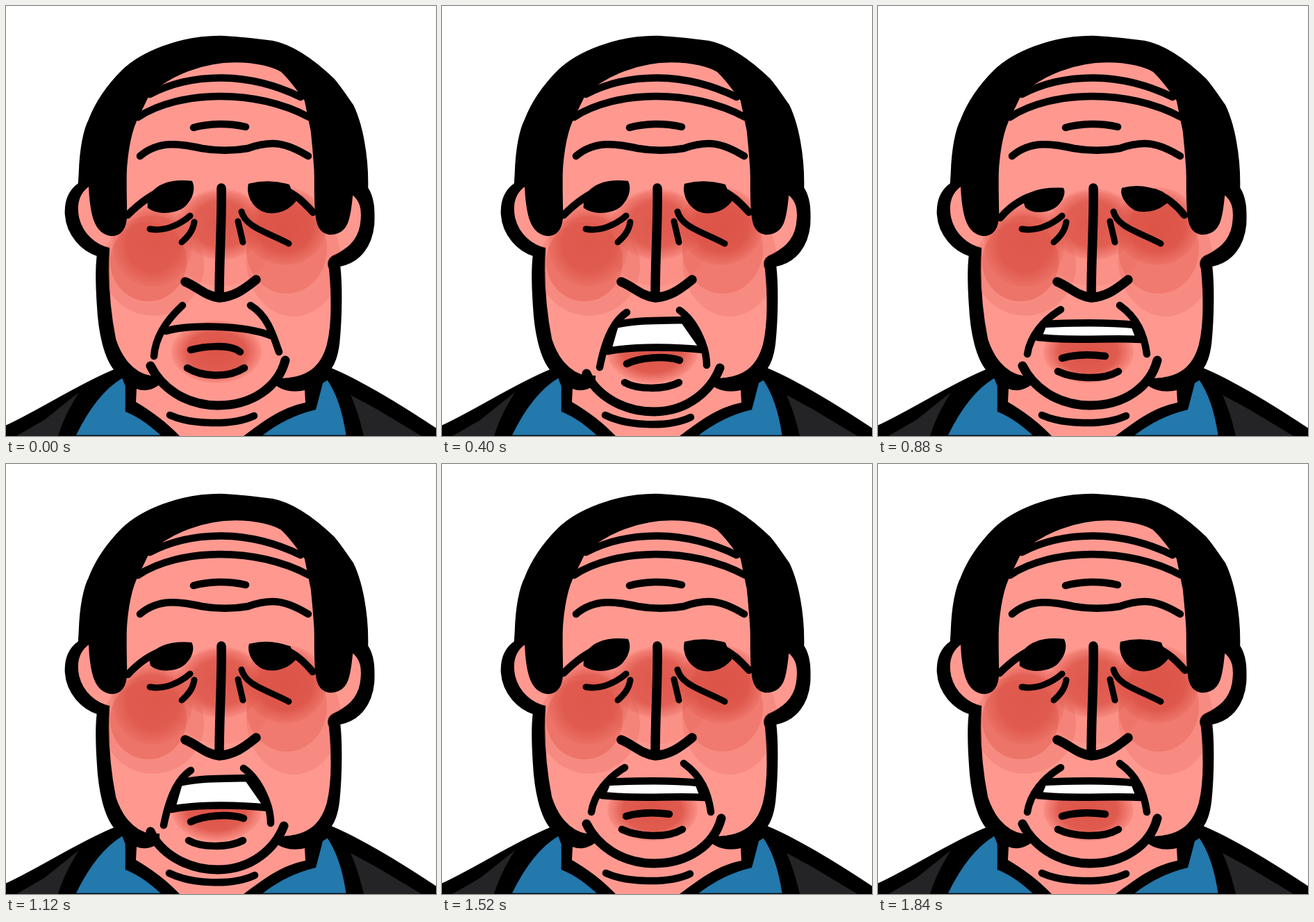
An HTML page for the animation above (1.92 s loop, 619 by 619 pixels).

```html
<!DOCTYPE html>
<html>
<head>
<meta charset="utf-8">
<style>
html, body { margin: 0; width: 100%; height: 100%; overflow: hidden; background: #fff; }
svg { display: block; width: 100%; height: 100%; }
.skin { fill: #ff9990; }
.blue { fill: #2378ac; }
.jacket { fill: #242426; }
.edge { stroke: #000; stroke-width: 2.5; }
.line { fill: none; stroke: #000; stroke-width: 10.5; stroke-linecap: round; stroke-linejoin: round; }
</style>
</head>
<body>
<svg viewBox="0 0 619 619">
  <defs>
    <radialGradient id="flush">
      <stop offset="0" stop-color="#dc5347"/>
      <stop offset=".65" stop-color="#dc5347" stop-opacity=".88"/>
      <stop offset="1" stop-color="#dc5347" stop-opacity=".15"/>
    </radialGradient>
    <path id="face" d="M205,128C235,98 285,80 330,80C362,80 385,87 397,94C412,108 422,124 431,136L440,180C443,210 446,250 446,270H498C512,280 514,295 511,315C507,340 490,352 470,361C464,365 463,372 466,378C470,420 470,460 463,488C454,520 435,535 400,537L207,533C182,529 165,505 157,480C149,440 145,400 148,349C130,345 110,330 104,305C100,285 105,268 120,258H172C172,220 178,185 187,165Z"/>
    <clipPath id="inFace"><use href="#face"/></clipPath>
  </defs>

  <!-- silhouette, clothes, neck -->
  <path class="edge" d="M106,240C107,205 113,177 120,164C130,138 147,114 168,93C195,67 250,44 308,44C335,45 358,48 383,51C415,57 447,82 472,106C484,120 492,134 499,143C512,170 521,215 520,262C529,276 530,292 529,315C526,345 510,368 480,374C483,400 483,445 479,485C477,502 473,514 467,522C510,540 565,573 619,609V619H0V605C50,582 105,545 157,524C142,506 134,470 132,430C130,400 130,375 132,359C110,352 88,330 86,300C85,280 92,265 105,256Z"/>
  <path class="jacket" d="M15,619L55,596L105,556C90,580 82,597 75,619ZM496,560L533,580L598,619H515C510,598 505,580 496,560Z"/>
  <path class="blue edge" d="M168,534L173,547V583C195,592 210,605 226,619H99C112,592 135,553 168,534ZM463,537C478,558 486,585 491,619H366C390,600 415,587 445,580L449,565L455,542Z"/>
  <use class="skin edge" href="#face"/>
  <path class="skin" d="M188,551C200,556 212,552 221,545V500H387V545C400,556 418,556 430,553L431,571C395,578 368,600 342,619H250C232,600 209,583 187,570Z"/>

  <!-- flushed cheeks and nose -->
  <g clip-path="url(#inFace)" fill="#dc5347">
    <ellipse cx="212" cy="374" rx="73" ry="72" opacity=".22"/>
    <ellipse cx="205" cy="368" rx="55" ry="57" opacity=".4"/>
    <ellipse cx="310" cy="335" rx="75" ry="68" opacity=".12"/>
    <ellipse cx="414" cy="365" rx="68" ry="82" opacity=".2"/>
    <ellipse cx="404" cy="350" rx="58" ry="64" opacity=".3"/>
    <g fill="url(#flush)">
      <ellipse cx="211" cy="343" rx="58" ry="61" opacity=".85"/>
      <ellipse cx="310" cy="314" rx="64" ry="51" opacity=".92"/>
      <ellipse cx="402" cy="317" rx="60" ry="56"/>
    </g>
  </g>
  <ellipse cx="303" cy="498" rx="65" ry="45" fill="url(#flush)"/>

  <!-- sideburns -->
  <path class="edge" d="M120,250L172,235L173,300C173,320 165,330 152,330C130,328 121,305 120,250ZM445,240H498V272C495,305 492,328 466,328C448,326 445,310 445,260Z"/>

  <!-- wrinkles and nose -->
  <path class="line" d="M207,127C270,95 350,95 424,131M190,160C250,121 360,119 436,160M270,175C292,169 320,168 345,174M193,216C220,193 250,198 282,205C305,209 325,209 348,205C385,192 405,198 435,216"/>
  <path class="line" style="stroke-width:9" d="M207,321C228,325 250,315 265,302M271,311C269,324 262,332 253,340M339,296C345,318 372,324 407,342M334,310L341,340"/>
  <path class="line" style="stroke-width:13.5" d="M310,262C311,310 307,360 307,419M258,397C275,404 288,418 307,420C328,418 340,410 360,394"/>

  <path id="lids" class="line"/>
  <path id="pupils" class="edge"/>
  <path id="teeth" class="line" style="fill:#fff"/>
  <path id="creases" class="line"/>
  <path id="chin" class="line" style="stroke-width:13"/>
</svg>
<script>
// Each part lists its poses: mouth closed / half / open, eyes open / narrow / shut.
const mouth = {
  teeth: [
    'M230,468C260,459 340,458 383,475L383,475C340,458 260,459 230,468Z',
    'M238,458C280,456 330,455 369,459L377,480C335,477 285,483 230,477Z',
    'M249,459C285,451 320,453 348,452L378,495C340,491 280,489 238,497Z'],
  creases: [
    'M254,431C230,453 215,478 213,504M352,431C377,446 385,475 393,498M266,495C285,490 322,486 337,498M261,521C280,533 318,537 343,521M236,589C265,602 325,605 357,590',
    'M263,437C238,452 219,475 215,501M348,431C373,449 383,472 387,501M265,507C282,502 305,501 327,504M259,526C280,536 322,540 346,526M236,589C265,602 325,605 357,590',
    'M266,441C243,456 233,490 227,520M342,438C364,453 381,490 381,517M266,515C285,506 320,503 342,510M263,542C280,552 320,553 341,542M235,589C265,604 325,608 358,592'],
  chin: [
    'M208,518C222,546 255,575 305,575C355,575 392,548 402,510',
    'M208,518C222,546 255,575 305,575C355,575 392,548 402,510',
    'M208,529C222,560 260,584 305,584C355,584 388,552 400,521']
};
const eyes = {
  lids: [
    'M175,301C190,286 207,272 228,264M398,263C418,271 430,284 442,297',
    'M176,305C190,288 210,275 230,271M398,268C418,276 430,287 441,301',
    'M176,305C190,293 220,284 262,283M355,282C395,282 425,290 441,302'],
  pupils: [
    'M205,278C214,258 236,250 267,253C271,261 269,274 261,283C251,298 221,301 205,290ZM350,257C370,252 390,253 407,258L416,281C402,298 382,300 368,294C355,287 347,272 350,257Z',
    'M209,277C222,265 242,262 266,263C269,268 266,277 261,283C250,298 223,299 213,289ZM352,263C370,258 390,260 410,269L415,283C400,296 382,297 370,293C358,286 349,273 352,263Z',
    'M210,284C225,280 245,279 262,279C266,280 266,284 261,286C250,288 223,289 213,287ZM355,278C370,278 390,279 410,284L413,287C400,287 382,288 370,286C358,285 350,281 355,278Z']
};
const mouthSteps = [[0, 0], [240, 1], [320, 1.35], [360, 1.7], [400, 2], [520, 1.5], [560, 1]];
const eyeSteps = [[0, 0], [760, .5], [840, 1], [920, 2], [1080, 1], [1120, .5], [1160, 0]];

const levelAt = (steps, t) => steps.findLast(([start]) => start <= t)[1];

function blend(poses, level) {
  const i = Math.min(Math.floor(level), poses.length - 2);
  const next = poses[i + 1].match(/\d+/g);
  let n = 0;
  return poses[i].replace(/\d+/g, v => +v + (next[n++] - v) * (level - i));
}

function show(parts, level) {
  for (const id in parts) document.getElementById(id).setAttribute('d', blend(parts[id], level));
}

function draw() {
  const t = performance.now() % 1920;
  show(mouth, levelAt(mouthSteps, t % 640));
  show(eyes, levelAt(eyeSteps, t));
  requestAnimationFrame(draw);
}
draw();
</script>
</body>
</html>
```
